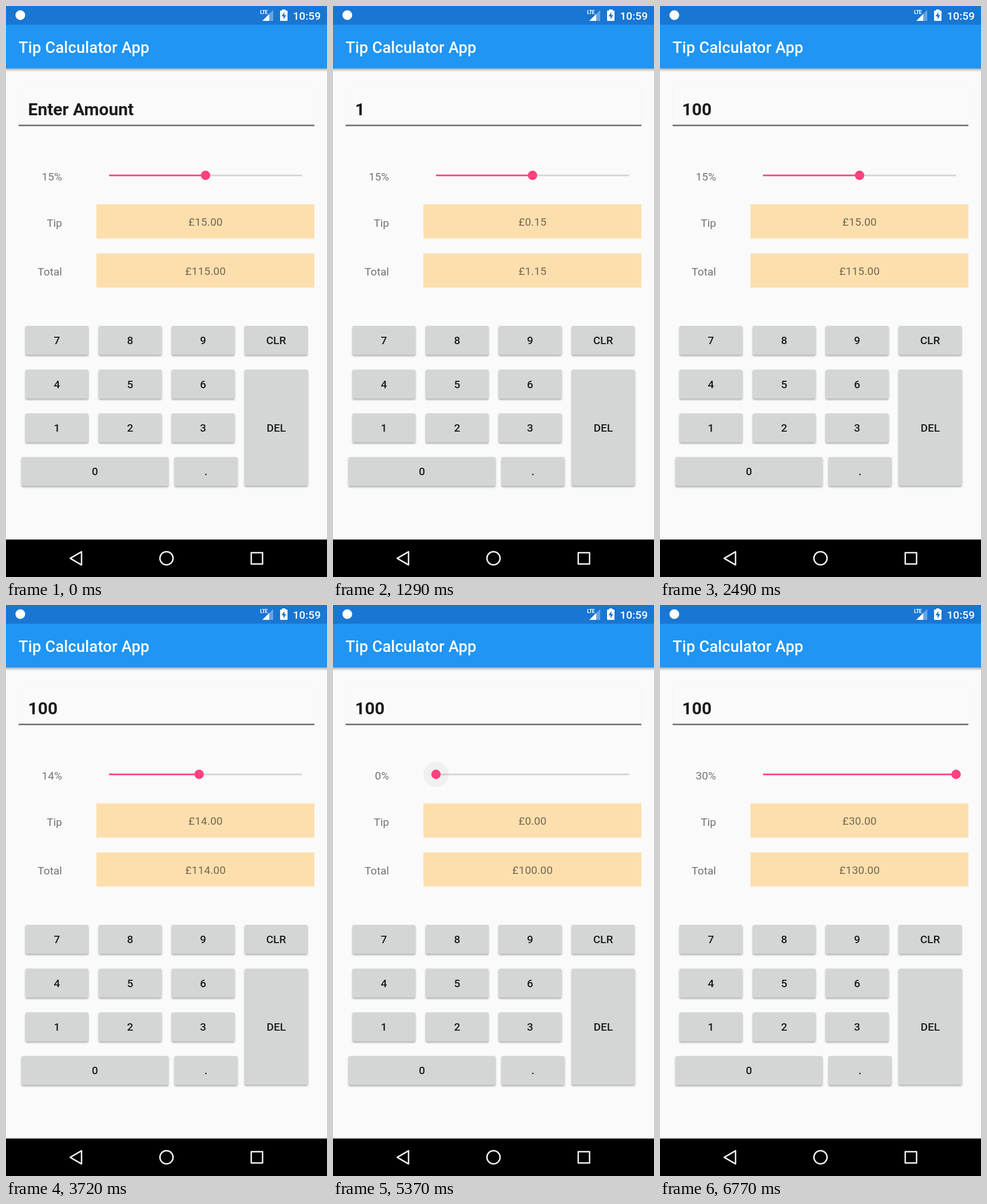
Write an HTML page that moves like this. It is 561 by 998 pixels and loops after 8000 ms.

```html
<!DOCTYPE html>
<html lang="en">
<head>
<meta charset="utf-8">
<title>Tip calculator</title>
<style>
  html, body { margin: 0; width: 100%; height: 100%; overflow: hidden; background: #fafafa; }
  svg { display: block; width: 100%; height: 100%; }
  text { font: 400 19.1px Roboto, sans-serif; fill: rgba(0, 0, 0, .54); }
  .mid { text-anchor: middle; }
  .end { text-anchor: end; }
  .value { letter-spacing: .15px; }
  .key text { font-weight: 500; fill: #1c1c1c; text-anchor: middle; }
  .nav { fill: none; stroke: #f2f2f2; stroke-width: 2.5; stroke-linejoin: round; }
</style>
</head>
<body>
<svg id="stage" viewBox="0 0 561 998">
  <defs>
    <linearGradient id="drop" x2="0" y2="1">
      <stop stop-color="#000" stop-opacity=".3"/>
      <stop offset="1" stop-color="#000" stop-opacity="0"/>
    </linearGradient>
  </defs>

  <rect width="561" height="998" fill="#fafafa"/>
  <rect y="109" width="561" height="6" fill="url(#drop)"/>
  <rect y="32" width="561" height="77.2" fill="#2095f3"/>
  <rect width="561" height="32.7" fill="#1976d2"/>
  <text x="22" y="81.5" style="font-size:27.3px;font-weight:500;letter-spacing:.17px;fill:#fff">Tip Calculator App</text>

  <!-- status bar -->
  <g fill="#fff">
    <circle cx="25" cy="16" r="8.5"/>
    <text x="444" y="14.2" style="font-size:9px;font-weight:700;letter-spacing:-.5px;fill:#fff">LTE</text>
    <path d="M448 26H467V7Z" opacity=".35"/>
    <path d="M448 26H460V14Z"/>
    <path d="M482.5 8V6H488.5V8H491Q492 8 492 9V25Q492 26 491 26H480Q479 26 479 25V9Q479 8 480 8Z"/>
    <path d="M486.5 10.5L481.5 18H485V23.5L489.7 16H486.5Z" fill="#1976d2"/>
    <text x="550" y="24" class="end" style="font-weight:500;fill:#fff">10:59</text>
  </g>

  <!-- amount field -->
  <rect x="22.5" y="142.5" width="516" height="66" fill="none" stroke="#000" stroke-opacity=".015"/>
  <rect x="22" y="207.4" width="517" height="2.7" fill="#727275"/>
  <text id="amount" x="38.5" y="191" style="font-size:30px;font-weight:700;fill:#1c1c1c"></text>

  <!-- tip rate and results -->
  <text id="rate" x="98" y="304.8" class="end"></text>
  <text x="98" y="385.8" class="end">Tip</text>
  <text x="98" y="471.2" class="end">Total</text>
  <rect x="158" y="346.7" width="381" height="59.8" fill="#fddfae"/>
  <rect x="158" y="432.5" width="381" height="59.7" fill="#fddfae"/>
  <text id="tip" x="348.7" y="384.2" class="mid value"></text>
  <text id="total" x="348.7" y="470" class="mid value"></text>

  <!-- slider -->
  <rect x="180" y="294.7" width="337.5" height="2.7" fill="#d3d3d3"/>
  <rect id="filled" x="180" y="294.7" height="2.7" fill="#ff4081"/>
  <circle id="halo" cy="296" r="22"/>
  <circle id="ring" cy="296"/>
  <circle id="thumb" cy="296" fill="#ff4081"/>

  <g id="keys"></g>

  <rect y="932.5" width="561" height="65.5" fill="#000"/>
  <path class="nav" d="M132 953.8V976.8L112.2 965.3Z"/>
  <circle class="nav" cx="280.5" cy="965.2" r="11.5"/>
  <rect class="nav" x="428.6" y="955.4" width="19.8" height="19.8"/>
</svg>

<script>
const LOOP = 8000;
const $ = id => document.getElementById(id);
const clamp = v => Math.max(0, Math.min(1, v));
const set = (el, attrs) => { for (const k in attrs) el.setAttribute(k, attrs[k]); };

function add(parent, tag, attrs, text = '') {
  const el = document.createElementNS('http://www.w3.org/2000/svg', tag);
  set(el, attrs);
  el.textContent = text;
  return parent.appendChild(el);
}

// Keypad
const keys = {};
function makeKey(label, x, y, width = 110, height = 50.8) {
  const box = { x, y, width, height, rx: 2.7 };
  const g = add($('keys'), 'g', { class: 'key' });
  const face = add(g, 'rect', { ...box, fill: '#d4d6d6' });
  const clip = add(g, 'clipPath', { id: 'clip' + Object.keys(keys).length });
  add(clip, 'rect', box);
  const ripple = add(g, 'circle', {
    cx: x + width / 2, cy: y + height / 2, opacity: 0, 'clip-path': `url(#${clip.id})`
  });
  add(g, 'text', { x: x + width / 2, y: y + height / 2 + 6.6 }, label);
  keys[label] = { face, ripple, reach: Math.hypot(width, height) / 2 };
  lift(keys[label], 0);
}
function lift(key, z) {
  key.face.style.filter =
    `drop-shadow(0 ${2 + 2 * z}px ${1.4 + 1.4 * z}px rgba(0,0,0,${.32 + .04 * z}))`;
}

const rows = [559, 635.5, 712, 788.2];
const cols = [34, 162, 289.5, 417];
['789', '456', '123'].forEach((row, r) =>
  [...row].forEach((digit, c) => makeKey(digit, cols[c], rows[r])));
makeKey('CLR', cols[3], rows[0]);
makeKey('DEL', cols[3], rows[1], 110.5, 203);
makeKey('0', 27, rows[3], 257);
makeKey('.', 294.5, rows[3]);

// Touches: down and up times in ms
const taps = [
  { label: '1', down: 560, up: 700 },
  { label: '0', down: 1750, up: 1850 },
  { label: '0', down: 1930, up: 2130 }
];
const drags = [{ down: 3720, up: 5100 }, { down: 5530, up: 6400 }];
const path = [
  [3700, 15], [3720, 14], [4340, 5], [4690, 5], [4710, 4], [4950, 0],
  [5520, 0], [5730, 22], [5950, 29], [6250, 29], [6280, 30]
];

const latest = (list, t) => list.filter(p => p.down <= t).pop();
const pressed = (p, t) => p ? clamp((t - p.down) / 100) * clamp(1 - (t - p.up) / 100) : 0;
const fade = (p, t) => p ? clamp(1 - (t - p.up) / 360) : 0;

function rateAt(t) {
  const i = path.findIndex(p => p[0] > t);
  if (i === 0) return path[0][1];
  if (i < 0) return path[path.length - 1][1];
  const [t0, a] = path[i - 1], [t1, b] = path[i];
  return Math.round(a + (b - a) * (t - t0) / (t1 - t0));
}

function drawKeys(t) {
  for (const label of ['1', '0']) {
    const key = keys[label];
    const tap = latest(taps.filter(p => p.label === label), t);
    const p = tap ? clamp((t - tap.down) / 250) : 0;
    lift(key, pressed(tap, t));
    set(key.ripple, {
      r: key.reach * (.3 + .7 * p * (2 - p)),
      opacity: .04 * fade(tap, t)
    });
  }
}

function drawSlider(t, rate) {
  const x = 180 + 337.5 * rate / 30;
  const drag = latest(drags, t);
  const age = drag ? t - drag.down : 0;
  set($('filled'), { width: x - 180 });
  set($('thumb'), { cx: x, r: 8.2 + 3.9 * pressed(drag, t) });
  set($('halo'), { cx: x, opacity: .08 * clamp(age / 120) * fade(drag, t) });
  set($('ring'), { cx: x, r: 22 * clamp(age / 270), opacity: .08 * fade(drag, t) });
}

function draw(now) {
  const t = now % LOOP;
  const typed = taps.filter(p => p.up <= t).map(p => p.label).join('');
  const amount = typed ? +typed : 100;
  const rate = rateAt(t);
  const tip = amount * rate / 100;
  $('amount').textContent = typed || 'Enter Amount';
  $('rate').textContent = rate + '%';
  $('tip').textContent = '£' + tip.toFixed(2);
  $('total').textContent = '£' + (amount + tip).toFixed(2);
  drawKeys(t);
  drawSlider(t, rate);
  requestAnimationFrame(draw);
}
requestAnimationFrame(draw);
</script>
</body>
</html>
```
